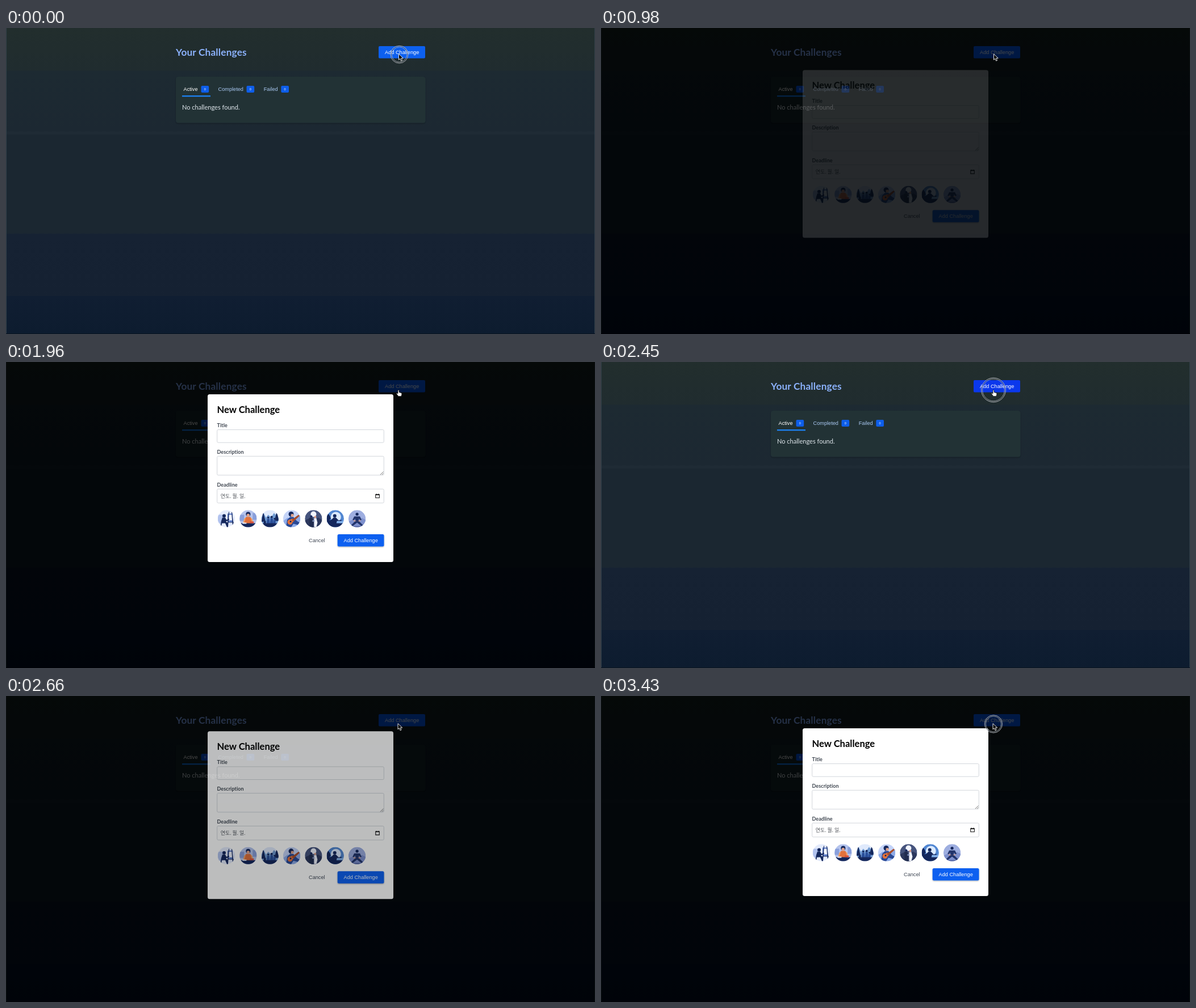
An HTML page for the animation above (3570 ms loop, 1037x540 px).

```html
<!DOCTYPE html>
<html lang="en">
<head>
<meta charset="utf-8">
<title>Challenges</title>
<style>
  html, body { margin: 0; width: 100%; height: 100%; overflow: hidden; background: #1c2832; }
  svg { display: block; width: 1037px; height: 540px; }
  text { font: 9.2px "Liberation Sans", Arial, sans-serif; fill: #fff; }
  .lato { font-family: Lato, sans-serif; }
  .head { font-size: 17.2px; font-weight: 700; letter-spacing: .2px; fill: #8bb1fb; }
  .tab { fill: #a9c8f2; }
  .badge { font-size: 5.5px; text-anchor: middle; }
  .label { font-size: 9px; font-weight: 700; letter-spacing: .06px; fill: #3f4650; }
  .date { font: 8.8px "Noto Sans CJK KR", "Noto Sans CJK", sans-serif; fill: #4b4f55; }
  .field rect { fill: #fff; stroke: #d3d7dc; }
  .dim { filter: brightness(.29) contrast(1.04); }
</style>
</head>
<body>
<svg viewBox="0 0 1037 540">
  <defs>
    <linearGradient id="sky" x2="0" y2="1">
      <stop offset="0" stop-color="#222e2d"/><stop offset=".139" stop-color="#202c2f"/>
      <stop offset=".141" stop-color="#1d2a32"/><stop offset=".337" stop-color="#1c2832"/>
      <stop offset=".339" stop-color="#1f2b35"/><stop offset=".347" stop-color="#1f2b35"/>
      <stop offset=".349" stop-color="#1b2731"/><stop offset=".671" stop-color="#1b2731"/>
      <stop offset=".673" stop-color="#162233"/><stop offset=".875" stop-color="#152132"/>
      <stop offset=".877" stop-color="#101e32"/><stop offset="1" stop-color="#0d1c2f"/>
    </linearGradient>
    <clipPath id="disc"><circle r="15.2"/></clipPath>
    <filter id="soft" x="-10%" y="-30%" width="120%" height="180%">
      <feDropShadow dx="0" dy="1" stdDeviation="1.2" flood-opacity=".35"/>
    </filter>
  </defs>

  <g id="page">
    <rect width="1037" height="540" fill="url(#sky)"/>
    <path d="M.5 0V540M1036.5 0V540" stroke="#33414a"/>
    <path d="M0 539.5H1037" stroke="#0a1420"/>
    <text class="lato head" x="299" y="49">Your Challenges</text>
    <rect id="add" x="656" y="32" width="82" height="21.5" rx="2"/>
    <text x="667" y="46">Add Challenge</text>
    <rect x="299" y="86" width="439.5" height="81.5" rx="4" fill="#203036" filter="url(#soft)"/>
    <text x="312.5" y="111">Active</text>
    <text class="tab" x="373.5" y="111">Completed</text>
    <text class="tab" x="453.7" y="111">Failed</text>
    <g id="badges"></g>
    <rect x="310" y="119" width="50" height="2.3" fill="#1c81f2"/>
    <text class="lato" x="310" y="143.5" style="font-size:11.04px;fill:#dfe6ec">No challenges found.</text>
  </g>

  <g id="modal">
    <rect x="355" y="57" width="327" height="296" rx="3.5" fill="#fff"/>
    <text class="lato" x="371.5" y="89.5" style="font-size:16.56px;font-weight:700;fill:#000">New Challenge</text>
    <g class="lato">
      <text class="lato label" x="371.5" y="115">Title</text>
      <text class="lato label" x="371.5" y="162">Description</text>
      <text class="lato label" x="371.5" y="220">Deadline</text>
    </g>
    <g class="field">
      <rect x="371.7" y="119.5" width="293.6" height="22.7" rx="2"/>
      <rect x="371.7" y="166.3" width="293.6" height="33.4" rx="2"/>
      <rect x="371.7" y="224.2" width="293.6" height="24.6" rx="2"/>
    </g>
    <path d="M659 199L664.5 193.500M662 199L664.500 196.500" stroke="#555" stroke-width=".8"/>
    <text class="date" x="377.8" y="239.8">연도. 월. 일.</text>
    <path d="M650.8 233.800h6.500v6h-6.500zM650.800 234.500h6.500M652.200 232.600v1M655.900 232.600v1" fill="none" stroke="#111" stroke-width="1.1"/>
    <g id="pics"></g>
    <text x="533" y="318" style="fill:#3f4754">Cancel</text>
    <rect x="583.700" y="304" width="81.800" height="21.500" rx="2.500" fill="#0d60f0" filter="url(#soft)"/>
    <text x="594.500" y="318">Add Challenge</text>
  </g>

  <g id="pointer">
    <g id="ring" fill="none">
      <circle id="shade" stroke="#1b2430" stroke-opacity=".45" stroke-width="2"/>
      <circle id="outer" stroke="#fff" stroke-opacity=".8" stroke-width=".8"/>
      <circle id="inner" stroke="#fff" stroke-opacity=".65" stroke-width=".8"/>
    </g>
    <path id="arrow" d="M-1-.8V9.400L1.400 7.300 3.100 11.300 5 10.500 3.300 6.600H6.700z" fill="#000" stroke="#fff" stroke-width=".9"/>
    <path id="hand" d="M-1 1.200q0-1.200 1-1.200t1 1.200V4l3.600 1q1.400.4 1.300 1.900L5.400 9.200 4.900 11H-.3L-3.300 6.900q-.6-1 .3-1.300.800-.2 2 1z" fill="#fff" stroke="#111" stroke-width=".7"/>
  </g>
</svg>
<script>
const $ = id => document.getElementById(id);
const LOOP = 3570, STEP = 70;
const OPEN = [[940, 2030], [2515, LOOP]];
const HOVER = [[840, 945], [2030, 2520]];
const HAND = [[840, 945], [1960, 2520]];
// start, end, first radius, last radius
const RINGS = [[0, 70, 15.4, 15.4], [840, 980, 21.4, 16], [1680, 1890, 15.4, 15.4],
               [2450, 2590, 21.4, 16], [3360, LOOP, 15.8, 15.4]];

$('badges').innerHTML = [343.5, 423.5, 484.3].map(x =>
  `<rect x="${x}" y="102" width="13.7" height="12" rx="2" fill="#0e5eea"/>
   <text class="badge" x="${x + 6.8}" y="110">0</text>`).join('');

// Small round illustrations: backdrop colour, then [fill, path] layers
const navy = '#14275c', skin = '#e0a48e', orange = '#e2713c', white = '#f2f5ff';
const head = (x, y, r) => `M${x - r} ${y}a${r} ${r} 0 1 0 ${2 * r} 0a${r} ${r} 0 1 0 ${-2 * r} 0`;
const pics = [
  ['#e4ebfc', ['#b2c3ee', 'M-15-7h9V9h-9z'], ['#5879c8', 'M2-9h9V6H2z'], [white, 'M4-7h6V3H4z'],
    [navy, head(-4, -5, 3)], [navy, 'M-7-2l5 0 2 4 5-2 0 2-6 3 3 2 1 8h-2L-2 8l-6 0-1 7h-2L-9 4z'],
    [navy, 'M4-12h1L3 14H1zM9-12h1l3 26h-2zM2 6h11v1H2z']],
  ['#b5c4ed', ['#899fdb', 'M-15-7h8V4h-8zM8-10h7V2H8z'], [navy, head(0, -8, 4)], [skin, head(0, -6, 2.7)],
    ['#f0a269', 'M-7 0l4-3h6l4 3 2 7H-9z'], [orange, 'M-4-3l8 0 3 12H-7z'],
    [navy, 'M-15 8h30v7h-30z'], [white, 'M-10 7h7v2h-7z'], ['#d64f3a', 'M3 5h7v3H3z']],
  ['#e0eafc', ['#719cd3', 'M-15-2l4-8 4 8 4-5 5 5 5-8 8 8V8h-30z'], [navy, 'M-15 6l3-18 4 16zM8 4l4-17 4 17z'],
    [navy, head(-3, -2, 1.8)], [navy, head(3, -3, 2)], [navy, head(8, 0, 1.6)],
    ['#294e99', 'M-5 0h4l1 9h-6zM1-1h4l1 10H0zM6 2h4v7H6z'], [navy, 'M-11 4h4v5h-4zM-15 8h30v7h-30z']],
  ['#c5d4f8', ['#8eabe8', 'M-15 4l8-6 8 4 14-8v21h-30z'], [navy, head(-1, -8, 4.5)], [skin, head(1, -6, 2.6)],
    ['#294995', 'M-8 2l5-5h6l6 7 5 3-3 4-8-2-4 6h-9z'], [orange, head(-3, 6, 4.5)], [orange, head(1, 3, 3)],
    ['#a84d2b', 'M0 2L12-7l2 2L3 5z'], [navy, head(-2, 5, 1.5)]],
  ['#46547d', ['#2c385d', 'M-15 3l8-4 7 4 8-5 7 4v14h-30z'], [white, head(0, -8, 5)],
    [navy, head(-4, -4, 2)], [skin, head(3, -3, 2)], ['#202c4f', 'M-7-2h5l2 7-1 10h-6z'],
    [white, 'M1-1h4l2 8-2 8H1z'], ['#98a9d3', 'M-2 3h4v2h-4z']],
  ['#5287d2', ['#dbeaff', head(1, -3, 9)], ['#83b2ec', 'M-15 4h30v6h-30z'], [navy, head(-1, -5, 3)],
    [navy, 'M-7 2l4-4h4l5 5 5-1v2H3l-1 4h13v7h-30V4z'], [navy, 'M-15-9q5 0 7 9l-7 8z']],
  ['#9eaee0', ['#7e90cd', 'M-15 5l9-4 7 2 8-4 6 3v13h-30z'], [navy, head(0, -8, 2.6)],
    ['#22346b', 'M-5-4h10l3 6-2 1-3-3 0 4 8 8-2 2L0 7l-9 7-2-2 8-8 0-4-3 3-2-1z'],
    [skin, 'M-7 2l2 1 4 1-4 1zM7 2l-2 1-4 1 4 1z'], ['#5364a1', 'M-15 13h30v2h-30z']]
];
$('pics').innerHTML = pics.map(([bg, ...layers], i) =>
  `<g transform="translate(${388 + 38.35 * i} 276.5)" clip-path="url(#disc)"><circle r="15.2" fill="${bg}"/>${
    layers.map(([fill, d]) => `<path fill="${fill}" d="${d}"/>`).join('')}</g>`).join('');

// Cubic bezier (.25, .1, .35, 1), solved by bisection
function ease(x) {
  if (x >= 1) return 1;
  const at = (a, b, u) => 3 * (1 - u) ** 2 * u * a + 3 * (1 - u) * u * u * b + u ** 3;
  let lo = 0, hi = 1;
  for (let i = 0; i < 20; i++) {
    const mid = (lo + hi) / 2;
    if (at(.25, .35, mid) < x) lo = mid; else hi = mid;
  }
  return at(.1, 1, lo);
}

const during = (list, t) => list.find(([a, b]) => t >= a && t < b);
const show = (id, on) => $(id).style.display = on ? '' : 'none';

function draw(t) {
  const open = during(OPEN, t);
  show('modal', open);
  $('page').setAttribute('class', open ? 'dim' : '');
  if (open) {
    const p = ease((t - open[0]) / 300);
    $('modal').setAttribute('opacity', p);
    $('modal').setAttribute('transform', `translate(0 ${20 * (1 - p)})`);
  }
  $('add').setAttribute('fill', during(HOVER, t) ? '#0b38ec' : '#0d60ef');

  const hand = during(HAND, t);
  show('hand', hand);
  show('arrow', !hand);
  const move = Math.min(1, Math.max(0, (t - 1680) / 280));
  $('pointer').setAttribute('transform', `translate(${692.5 - 1.5 * move} ${46.7 + 2.7 * move})`);

  const ring = during(RINGS, t);
  show('ring', ring);
  if (ring) {
    const [a, b, from, to] = ring;
    const r = from + (to - from) * Math.min(1, (t - a) / (b - a - STEP || 1));
    $('outer').setAttribute('r', r);
    $('shade').setAttribute('r', r - 1);
    $('inner').setAttribute('r', r - 2);
  }
}

function tick() {
  draw(Math.floor(performance.now() % LOOP / STEP) * STEP);
  requestAnimationFrame(tick);
}
tick();
</script>
</body>
</html>
```
